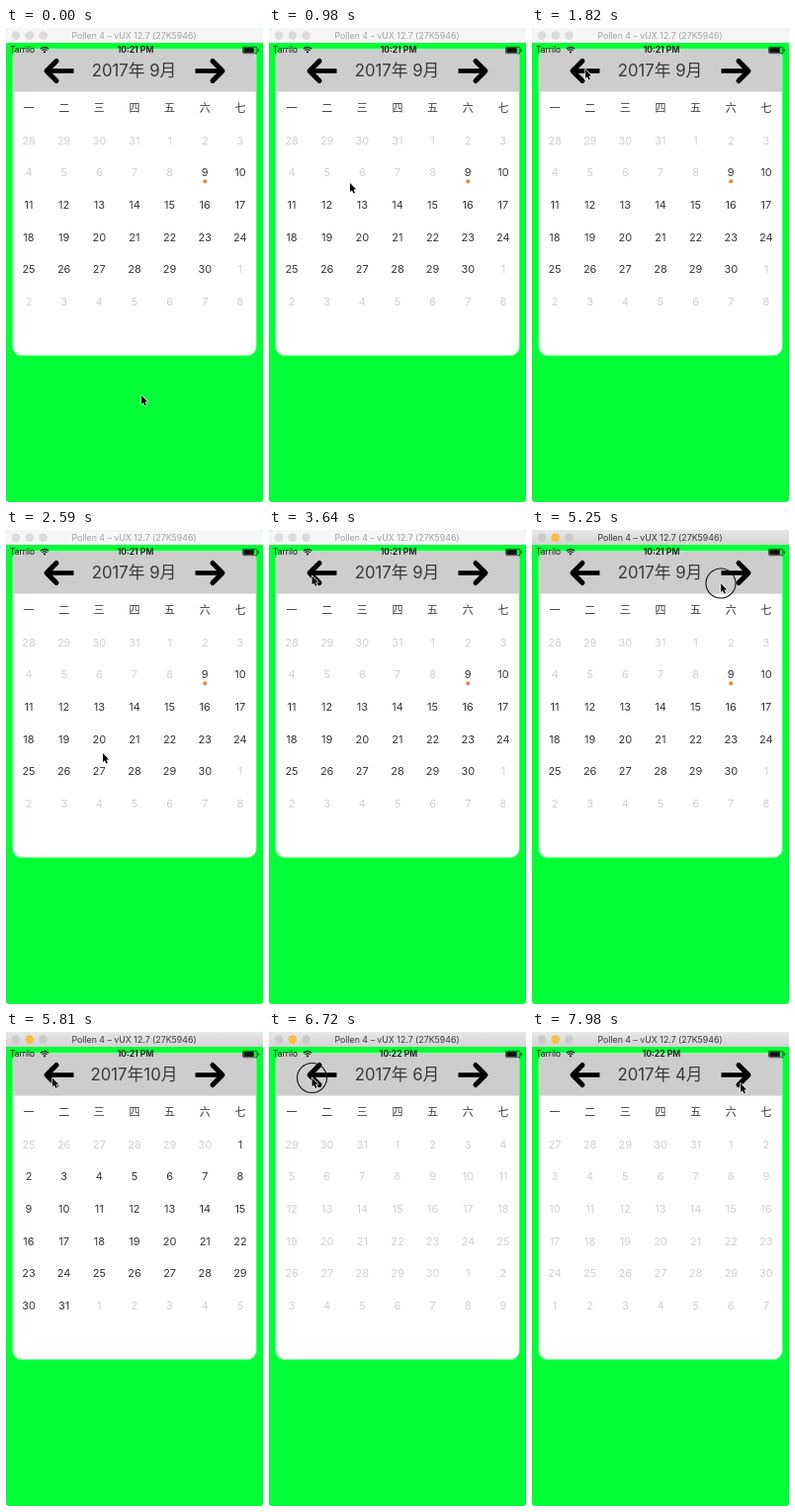
Recreate the animation shown at these times as an HTML page with a canvas. Size 260x480 px, loop 8 s.

```html
<!DOCTYPE html>
<html lang="zh">
<head>
<meta charset="utf-8">
<title>Calendar</title>
<style>
  html, body { margin: 0; width: 100%; height: 100%; overflow: hidden; background: #fff; }
  canvas { display: block; width: 260px; height: 480px; }
</style>
</head>
<body>
<canvas id="stage"></canvas>
<script>
const W = 260, H = 480, LOOP = 8000, STEP = 70;
const FONT = 'Inter, "Noto Sans CJK SC", "Noto Sans CJK JP", "Noto Sans CJK", sans-serif';
const YEAR = 2017, FIRST_MONTH = 9;
const TODAY = new Date(YEAR, 8, 9);
const ACTIVE_AT = 3850, MINUTE_AT = 6300;

// Times at which each arrow button turns the page
const NEXT = [4900, 5320];
const PREV = [3920, ...Array.from({ length: 5 }, (_, i) => 6030 + i * 225), 7350];

// Pointer moves between rests
const START = { x: 137, y: 372 };
const LEFT = { x: 43.5, y: 46.5 };
const MOVES = [
  { from: 0, to: 980, x: 82, y: 157 },
  { from: 980, to: 1820, x: 54, y: 42 },
  { from: 2030, to: 2590, x: 98, y: 226 },
  { from: 2590, to: 3710, ...LEFT },
  { from: 4060, to: 4410, x: 191, y: 54 },
  { from: 5460, to: 5950, ...LEFT },
  { from: 7490, to: 7980, x: 211, y: 52 }
];
const POINTER = new Path2D('M0 0V9L2 7.2L3.4 10.4L4.9 9.7L3.5 6.6L6.2 6.4Z');

const canvas = document.getElementById('stage');
const ctx = canvas.getContext('2d');
const scale = window.devicePixelRatio || 1;
canvas.width = W * scale;
canvas.height = H * scale;

const easeOut = k => 1 - (1 - k) ** 3;
const countPast = (times, t) => times.filter(at => t >= at).length;
const colX = col => 23 + col * 35.65;
const rowY = row => Math.floor(114.1 + row * 32.65);

function text(str, x, y, size, color, weight = 400, align = 'center') {
  ctx.font = `${weight} ${size}px ${FONT}`;
  ctx.textAlign = align;
  ctx.fillStyle = color;
  ctx.fillText(str, x, y);
}

function rect(x, y, w, h, color) {
  ctx.fillStyle = color;
  ctx.fillRect(x, y, w, h);
}

function disc(x, y, r, color) {
  ctx.fillStyle = color;
  ctx.beginPath();
  ctx.arc(x, y, r, 0, Math.PI * 2);
  ctx.fill();
}

function arc(x, y, r, from, to, width) {
  ctx.beginPath();
  ctx.arc(x, y, r, from, to);
  ctx.lineWidth = width;
  ctx.strokeStyle = '#111';
  ctx.stroke();
}

function drawTitleBar(active) {
  const fill = ctx.createLinearGradient(0, 0, 0, 15);
  fill.addColorStop(0, active ? '#e8e8e8' : '#f6f6f6');
  fill.addColorStop(1, active ? '#d3d3d3' : '#f6f6f6');
  rect(0, 0, W, 15, fill);
  const idle = active ? '#cbcbcb' : '#dcdcdc';
  for (let i = 0; i < 3; i++) {
    disc(10 + i * 13.8, 7.6, 4.3, active && i === 1 ? '#f9bd45' : idle);
  }
  text('Pollen 4 – vUX 12.7 (27K5946)', 129.5, 11, 8.8, active ? '#383838' : '#a2a2a2');
}

function drawStatusBar(t) {
  text('Tarrilo', 4, 25.2, 8.4, '#111', 400, 'left');
  text(t < MINUTE_AT ? '10:21 PM' : '10:22 PM', 131, 25.2, 8.6, '#111', 600);

  for (const r of [3.3, 5.4]) arc(39, 25, r, -Math.PI * 0.77, -Math.PI * 0.23, 1.1);
  disc(39, 24.3, 1.1, '#111');

  ctx.lineWidth = 0.7;
  ctx.beginPath();
  ctx.roundRect(239.5, 19.3, 14.5, 6.4, 1.2);
  ctx.stroke();
  rect(240.3, 20.1, 10.5, 4.8, '#111');
  rect(254.8, 21.3, 1, 2.4, '#111');
}

function drawArrow(tip, dir) {
  const y = 43.5;
  ctx.lineWidth = 5;
  ctx.strokeStyle = '#000';
  ctx.lineCap = ctx.lineJoin = 'round';
  ctx.beginPath();
  ctx.moveTo(tip + dir * 10, y - 10);
  ctx.lineTo(tip, y);
  ctx.lineTo(tip + dir * 10, y + 10);
  ctx.stroke();
  rect(tip, y - 2.3, dir * 27.5, 4.6, '#000');
}

function drawCard() {
  const top = 21.5, left = 7, width = 246;
  ctx.save();
  ctx.beginPath();
  ctx.roundRect(left, top, width, 310, 9);
  ctx.strokeStyle = 'rgba(255,255,255,.4)';
  ctx.lineWidth = 1.6;
  ctx.stroke();
  ctx.clip();
  rect(left, top, width, 310, '#fff');
  rect(left, top, width, 64.6 - top, '#cdcdcd');
  ctx.restore();
}

function drawMonth(month) {
  text(`${YEAR}年${String(month).padStart(2)}月`, 129.5, 49.3, 16.75, '#383838');
  [...'一二三四五六七'].forEach((day, i) => text(day, colX(i), 85, 11, '#3a3a3a'));

  const lead = (new Date(YEAR, month - 1, 1).getDay() + 6) % 7;
  for (let i = 0; i < 42; i++) {
    const date = new Date(YEAR, month - 1, 1 - lead + i);
    const x = colX(i % 7), y = rowY(Math.floor(i / 7));
    const open = date.getMonth() === month - 1 && date >= TODAY;
    text(date.getDate(), x, y + 4, 11, open ? '#363636' : '#d0d0d0');
    if (+date === +TODAY) disc(x, y + 9.3, 2.1, '#ea8744');
  }
}

function pointerAt(t) {
  let { x, y } = START;
  for (const move of MOVES) {
    if (t < move.from) break;
    const k = easeOut(Math.min(1, (t - move.from) / (move.to - move.from)));
    x += (move.x - x) * k;
    y += (move.y - y) * k;
  }
  return { x, y };
}

function drawPointer({ x, y }, pressed) {
  if (pressed) arc(x, y, 15, 0, Math.PI * 2, 1.1);
  ctx.save();
  ctx.translate(x, y);
  ctx.lineJoin = 'round';
  ctx.lineWidth = 1.3;
  ctx.strokeStyle = '#fff';
  ctx.stroke(POINTER);
  ctx.fillStyle = '#000';
  ctx.fill(POINTER);
  ctx.restore();
}

function draw(t) {
  ctx.setTransform(scale, 0, 0, scale, 0, 0);
  rect(0, 0, W, H, '#fff');
  ctx.save();
  ctx.beginPath();
  ctx.roundRect(0, 0, W, H, 3);
  ctx.clip();
  rect(0, 0, W, H, '#00ff36');
  drawTitleBar(t >= ACTIVE_AT);
  drawCard();
  drawStatusBar(t);
  drawArrow(41, 1);
  drawArrow(219, -1);
  drawMonth(FIRST_MONTH + countPast(NEXT, t) - countPast(PREV, t));
  const pressed = [...NEXT, ...PREV].some(at => t >= at - STEP && t < at + 2 * STEP);
  drawPointer(pointerAt(t), pressed);
  ctx.restore();
}

const start = performance.now();
function tick() {
  const t = (performance.now() - start) % LOOP;
  draw(Math.floor(t / STEP) * STEP);
  requestAnimationFrame(tick);
}
tick();
</script>
</body>
</html>
```
